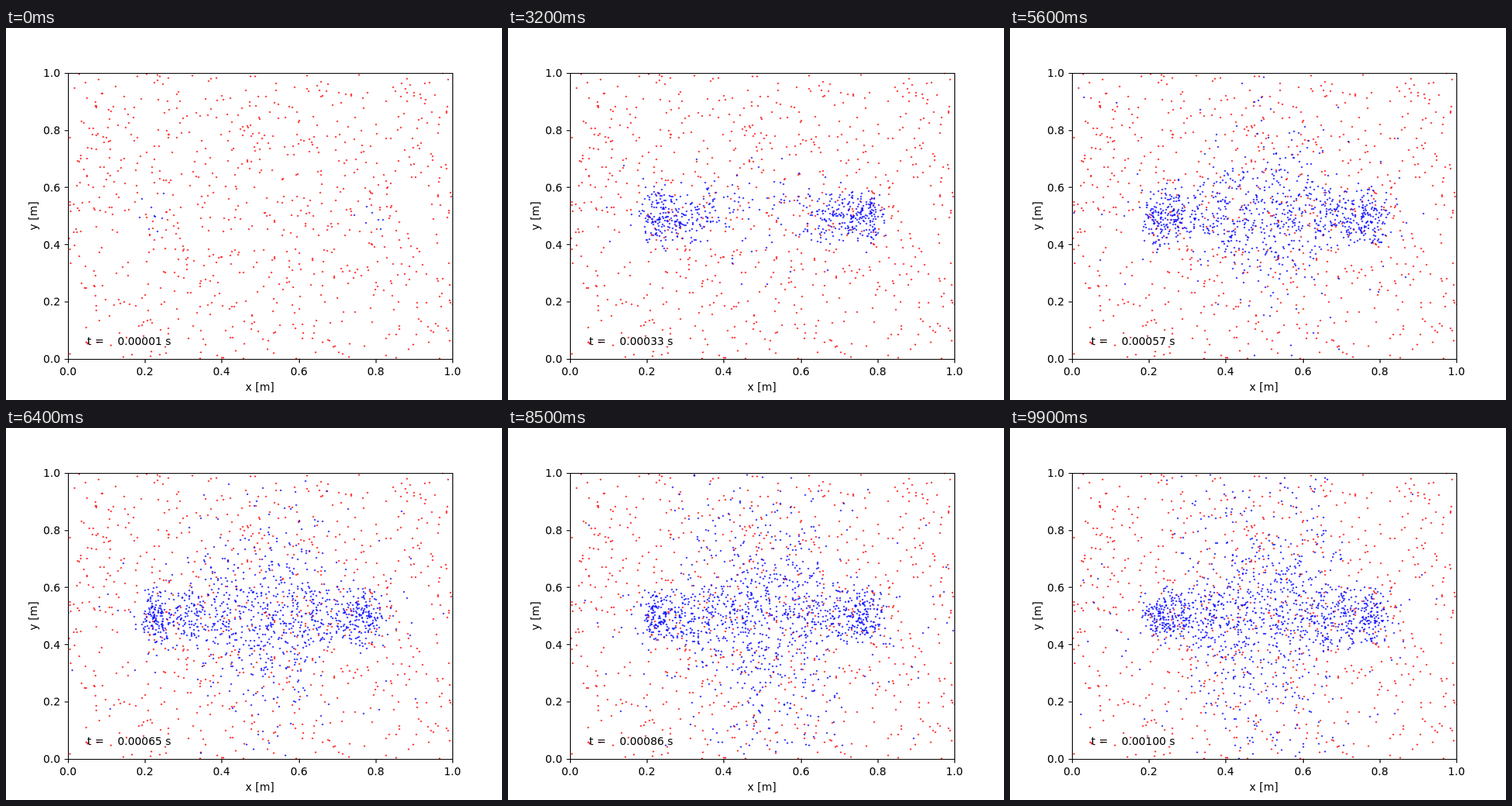
These frames come from a looping animation (640x480 px, 10 s). An HTML page:

```html
<!DOCTYPE html>
<html lang="en">
<head>
<meta charset="utf-8">
<title>Particle plot</title>
<style>
  html, body { margin: 0; width: 100%; height: 100%; overflow: hidden; background: #fff; }
  svg { display: block; width: 640px; height: 480px; }
  text { font: 13.89px "DejaVu Sans", sans-serif; white-space: pre; }
  .dots { fill: none; stroke-width: 2.2; stroke-linecap: round; }
  .axes { fill: none; stroke: #000; stroke-width: 1.11; }
</style>
</head>
<body>
<svg viewBox="0 0 640 480">
  <clipPath id="plot"><rect x="80" y="57.6" width="496" height="369.6"/></clipPath>
  <g clip-path="url(#plot)">
    <path id="neutrals" class="dots" stroke="#f00"/>
    <path id="ions" class="dots" stroke="#00f"/>
  </g>
  <path id="axes" class="axes"/>
  <g id="labels"></g>
  <text x="327.6" y="468" text-anchor="middle">x [m]</text>
  <text transform="translate(40 242.4) rotate(-90)" text-anchor="middle">y [m]</text>
  <text id="clock" x="104.8" y="408.8"></text>
</svg>
<script>
const STEPS = 100, STEP_MS = 100, IONS_PER_STEP = 17, NEUTRALS = 820;
const el = id => document.getElementById(id);
const toX = x => 80 + 496 * x;
const toY = y => 427.2 - 369.6 * y;
const snap = v => Math.floor(v + 0.5) + 0.5;

let seed = 20417;
function random() {
  seed = (seed + 0x6D2B79F5) | 0;
  let r = Math.imul(seed ^ (seed >>> 15), 1 | seed);
  r = (r + Math.imul(r ^ (r >>> 7), 61 | r)) ^ r;
  return ((r ^ (r >>> 14)) >>> 0) / 4294967296;
}
const between = (a, b) => a + (b - a) * random();
const spread = w => w * (random() + random() - 1);
const dot = (x, y) => `M${snap(toX(x))} ${snap(toY(y))}h0`;

function drawAxes() {
  let path = "M80.5 58.5H576.5V427.5H80.5Z", labels = "";
  for (let i = 0; i <= 5; i++) {
    const x = toX(i / 5), y = toY(i / 5), value = (i / 5).toFixed(1);
    path += `M${snap(x)} 427.5v4.86M80.5 ${snap(y)}h-4.86`;
    labels += `<text x="${Math.round(x - 11)}" y="448">${value}</text>` +
      `<text x="48" y="${Math.round(y + 5.2)}">${value}</text>`;
  }
  el("axes").setAttribute("d", path);
  el("labels").innerHTML = labels;
}

function makeIon(i) {
  const side = i % 2 ? -1 : 1;
  return {
    side,
    birth: Math.floor(i / IONS_PER_STEP) - random(),
    x: 0.5 - side * 0.285 + spread(0.045),
    y: 0.5 + spread(0.11),
    pace: between(28, 60),
    reach: between(0.2, 0.55),
    lift: between(-0.2, 0.2),
    life: between(60, 110),
    stray: random() < 0.1,
    angle: between(0, 2 * Math.PI),
    push: between(2e-5, 1.4e-4)
  };
}

// Ions leave their source slowly, then fan out and slow down against the other beam.
function ionAt(ion, age) {
  if (ion.stray) {
    const s = ion.push * age * age;
    return [ion.x + s * Math.cos(ion.angle), ion.y + s * Math.sin(ion.angle)];
  }
  const p = age / ion.pace, q = p ** 1.8;
  return [
    ion.x + ion.side * ion.reach * q / Math.hypot(1, q),
    ion.y + ion.lift * p ** 2.5
  ];
}

drawAxes();
el("neutrals").setAttribute("d",
  Array.from({ length: NEUTRALS }, () => dot(random(), random())).join(""));
const ions = Array.from({ length: STEPS * IONS_PER_STEP }, (_, i) => makeIon(i));

function draw(step) {
  let path = "";
  for (const ion of ions) {
    const age = step - ion.birth;
    if (age < 0 || age > ion.life) continue;
    const [x, y] = ionAt(ion, age);
    if (x >= 0 && x <= 1 && y >= 0 && y <= 1) path += dot(x, y);
  }
  el("ions").setAttribute("d", path);
  el("clock").textContent = `t = ${((step + 1) * 1e-5).toFixed(5).padStart(10)} s`;
}

const start = performance.now();
let shown = -1;
function tick() {
  const step = Math.floor((performance.now() - start) / STEP_MS) % STEPS;
  if (step !== shown) draw(shown = step);
  requestAnimationFrame(tick);
}
tick();
</script>
</body>
</html>
```
